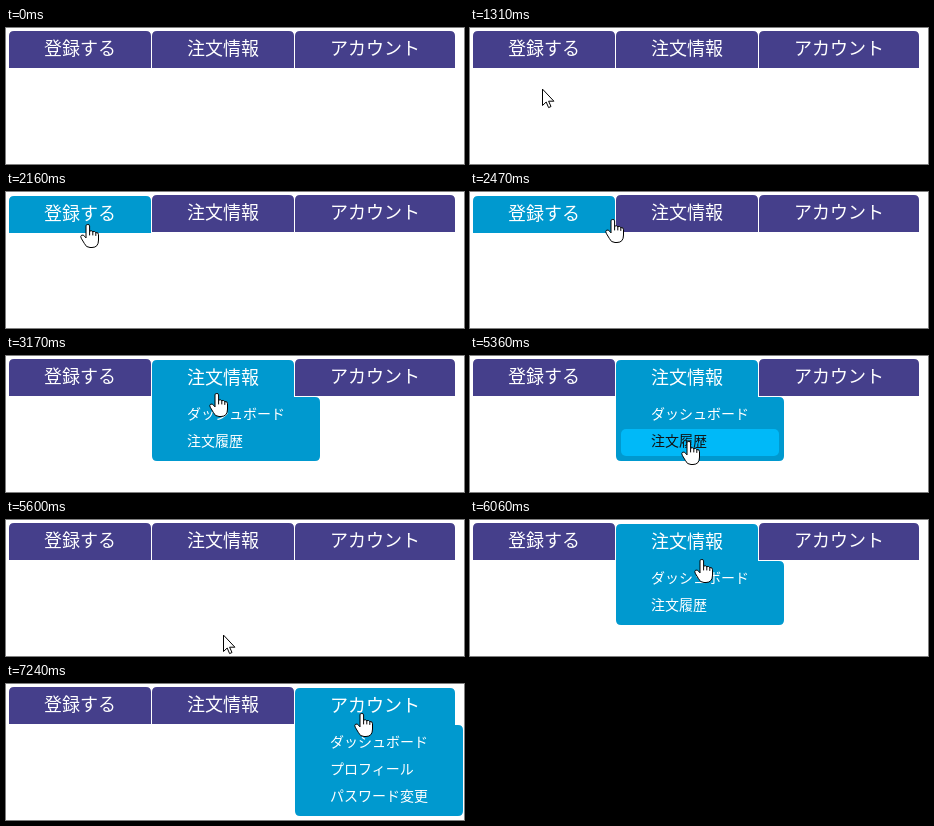
Recreate the animation shown at these times as an HTML page. Size 458 by 136 pixels, loop 8 s.

```html
<!DOCTYPE html>
<html lang="ja">
<head>
<meta charset="utf-8">
<title>メニュー</title>
<style>
  html, body { margin: 0; width: 100%; height: 100%; overflow: hidden; background: #fff; }
  svg { display: block; width: 100%; height: 100%; }
  text { font-family: "Noto Sans CJK JP", "Noto Sans CJK", sans-serif; font-weight: 500; fill: #fff; }
  .tab text { font-size: 18px; }
  .tab path { fill: #453f8b; }
  .tab.on path, .menu > path { fill: #0099cf; }
  .menu text { font-size: 14px; }
  .item rect { fill: none; }
  .item.on rect { fill: #00b9f8; }
  .item.on text { fill: #111; font-weight: 400; }
  .cursor path { fill: #fff; stroke: #000; stroke-linejoin: round; stroke-linecap: round; }
  .cursor .lines { fill: none; }
</style>
</head>
<body>
<svg viewBox="0 0 458 136" preserveAspectRatio="xMinYMin meet">
  <g id="nav"></g>
  <g id="hand" class="cursor">
    <path d="M-2 13.5V1.8Q-2 .5 -.2 .5T1.6 1.8V7.2Q3.4 6 4.8 7.7Q6.6 6.8 7.8 8.6Q10.5 8 10.5 10.8V16Q10.5 23.5 4 23.5H2Q-2 23.5 -3.6 19.5L-6.8 14.2Q-7.8 12 -6.4 11.2Q-4.8 10.4 -3.4 12.2Z"/>
    <path class="lines" d="M1.6 7.5V11M4.8 8V11M7.8 9V11.5"/>
  </g>
  <g id="arrow" class="cursor">
    <path d="M.5 .5V16.5L4.2 13L6.6 18.6L9 17.5L6.6 12.2H11.5Z"/>
  </g>
</svg>
<script>
const LOOP = 8000;
const TAB_BOTTOM = 41, MENU_W = 168, PAD = 5, ROW_H = 27;
const tabs = [
  { x: 3, w: 142, label: '登録する', items: [] },
  { x: 146, w: 142, label: '注文情報', items: ['ダッシュボード', '注文履歴'] },
  { x: 289, w: 160, label: 'アカウント', items: ['ダッシュボード', 'プロフィール', 'パスワード変更'] }
];

// Pointer moves: start, end, steps, target x, target y
const home = [60, 137];
const moves = [
  [1070, 1460, 6, 76, 34],
  [1850, 1850, 1, 78, 32],
  [2160, 2860, 10, 208, 21],
  [3090, 3330, 4, 213, 53],
  [3640, 4040, 6, 219, 80],
  [5360, 5600, 4, 217, 115],
  [5750, 6060, 5, 232, 39],
  [6530, 6610, 2, 231, 33],
  [7080, 7240, 3, 356, 29]
];

const NS = 'http://www.w3.org/2000/svg';
const byId = id => document.getElementById(id);

function add(parent, tag, attrs = {}, text = '') {
  const el = document.createElementNS(NS, tag);
  for (const key in attrs) el.setAttribute(key, attrs[key]);
  el.textContent = text;
  return parent.appendChild(el);
}

function build() {
  for (const tab of tabs) {
    const { x, w } = tab;
    tab.el = add(byId('nav'), 'g', { class: 'tab' });
    add(tab.el, 'path', { d: `M${x} 40V8q0-5 5-5h${w - 10}q5 0 5 5V40z` });
    add(tab.el, 'text', { x: x + 35, y: 27 }, tab.label);

    const h = tab.items.length * ROW_H + 2 * PAD;
    tab.menu = add(byId('nav'), 'g', { class: 'menu' });
    if (tab.items.length) {
      add(tab.menu, 'path', {
        d: `M${x} ${TAB_BOTTOM}h${MENU_W - 5}q5 0 5 5v${h - 10}q0 5-5 5h${10 - MENU_W}q-5 0-5-5z`
      });
    }
    tab.rows = tab.items.map((label, i) => {
      const y = TAB_BOTTOM + PAD + i * ROW_H;
      const row = add(tab.menu, 'g', { class: 'item' });
      add(row, 'rect', { x: x + PAD, y, width: MENU_W - 2 * PAD, height: ROW_H, rx: 5 });
      add(row, 'text', { x: x + 35, y: y + 17 }, label);
      return row;
    });
  }
}

const ease = p => p * p * (3 - 2 * p);

function pointer(t) {
  let [x, y] = home;
  for (const [start, end, steps, tx, ty] of moves) {
    if (t < start) break;
    const step = t >= end ? steps : Math.floor((t - start) / (end - start) * (steps - 1) + 0.02) + 1;
    const p = ease(step / steps);
    x += (tx - x) * p;
    y += (ty - y) * p;
  }
  return [x, y];
}

function hovered(t, x, y) {
  if (y < TAB_BOTTOM) return tabs.findIndex(tab => x >= tab.x - 1 && x < tab.x + tab.w);
  return t > 2860 && t < 5600 && y < 105 ? 1 : -1;
}

function render(t) {
  const [x, y] = pointer(t);
  const active = hovered(t, x, y);
  const row = Math.floor((y - TAB_BOTTOM - PAD) / ROW_H);
  tabs.forEach((tab, i) => {
    const on = i === active;
    tab.el.classList.toggle('on', on);
    tab.el.setAttribute('transform', `translate(0 ${on ? 1 : 0})`);
    tab.menu.style.display = on ? '' : 'none';
    tab.rows.forEach((el, k) => el.classList.toggle('on', on && k === row));
  });
  const at = `translate(${Math.round(x)} ${Math.round(y)})`;
  for (const id of ['hand', 'arrow']) {
    byId(id).setAttribute('transform', at);
    byId(id).style.display = (id === 'hand') === (active >= 0) ? '' : 'none';
  }
}

function tick() {
  render(performance.now() % LOOP);
  requestAnimationFrame(tick);
}

build();
tick();
</script>
</body>
</html>
```
